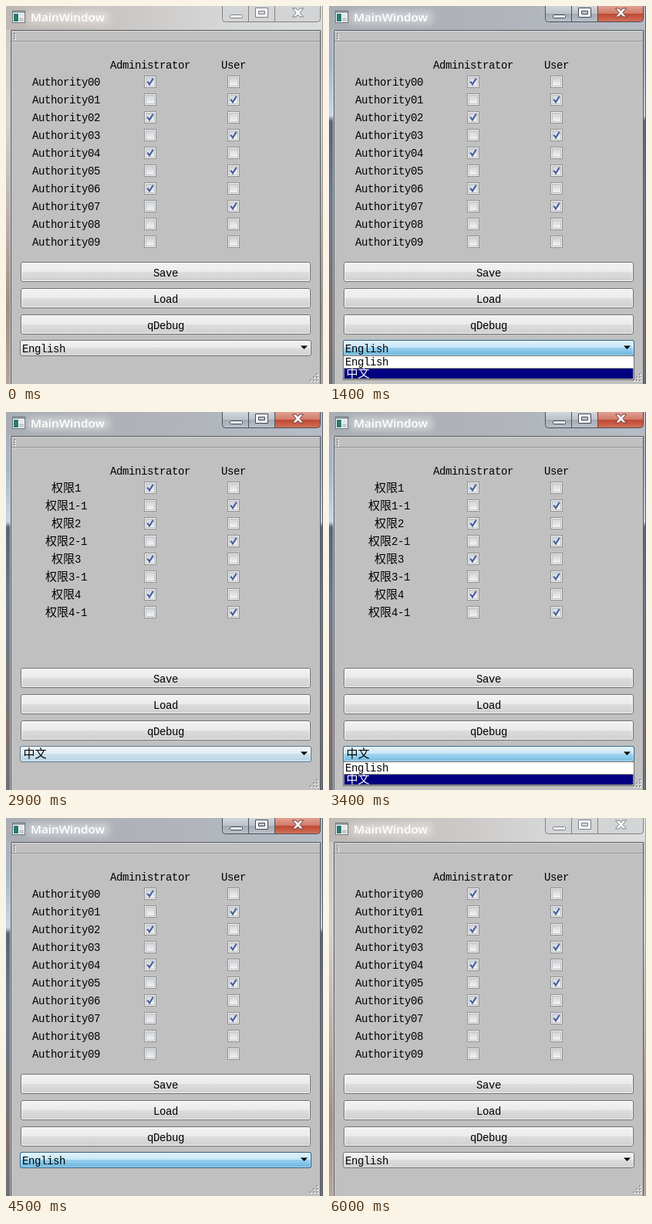
An HTML page for the animation above (6.1 s loop, 411x489 px).

```html
<!DOCTYPE html>
<html lang="en">
<head>
<meta charset="utf-8">
<title>MainWindow</title>
<style>
html, body { margin: 0; width: 100%; height: 100%; overflow: hidden; background: #c0c0c0; }
svg { display: block; }
text { font: 14px "Liberation Mono", monospace; letter-spacing: -0.4px; fill: #000; white-space: pre; }
.cjk { font: 300 15px "Noto Sans CJK SC", "Noto Sans CJK", sans-serif; letter-spacing: 0; }
.title { font: 600 15.2px "Open Sans", "Noto Sans", sans-serif; letter-spacing: 0; fill: #fff; }
.mid { text-anchor: middle; }
</style>
</head>
<body>
<svg id="stage" width="411" height="489" viewBox="0 0 411 489"></svg>
<script>
const LOOP = 6100;
const stage = document.getElementById('stage');

const rect = (x, y, w, h, fill, extra = '') =>
  `<rect x="${x}" y="${y}" width="${w}" height="${h}" fill="${fill}" ${extra}/>`;
const path = (d, extra) => `<path d="${d}" ${extra}/>`;
const text = (x, y, s, cls = '', extra = '') =>
  `<text x="${x}" y="${y}" class="${cls}" ${extra}>${s}</text>`;
const grad = (id, stops, across = false) =>
  `<linearGradient id="${id}" x2="${across ? 1 : 0}" y2="${across ? 0 : 1}">` +
  stops.map(([o, c]) => `<stop offset="${o}" stop-color="${c}"/>`).join('') + '</linearGradient>';
const split = (id, a, b, c, d) => grad(id, [[0, a], [.5, b], [.5, c], [1, d]]);

// CJK runs get their own face, the rest stays half width
const mixed = s => s.replace(/[\u4e00-\u9fff]+/g, m => `<tspan class="cjk">${m}</tspan>`);

const defs = '<defs>' +
  split('normal', '#f2f2f2', '#ebebeb', '#dddddd', '#cfcfcf') +
  split('hot', '#eaf6fd', '#d9f0fc', '#bee6fd', '#a7d9f5') +
  split('pressed', '#e5f4fc', '#c4e5f6', '#98d1ef', '#68b3db') +
  split('red', '#e2a598', '#d07a69', '#bd4630', '#d4715a') +
  split('glass', '#d3d7dd', '#bec3ca', '#a3a9b2', '#bbc1c9') +
  grad('box', [[0, '#cfd2d6'], [1, '#f5f5f5']]) +
  grad('idleTop', [[0, '#bdb8b3'], [.35, '#c9c6c3'], [.7, '#d6d7d8'], [1, '#dcdddd']], true) +
  grad('idleSide', [[0, '#c9c6c3'], [.3, '#d4d1ce'], [.6, '#b9aca2'], [.8, '#a08f84'], [1, '#b5a59a']]) +
  grad('liveTop', [[0, '#a9adb4'], [.5, '#b0b3b9'], [1, '#b6bcc5']], true) +
  grad('liveSide', [[0, '#abb0b8'], [.15, '#a6b6ca'], [.29, '#c8d8e8'], [.305, '#56657a'], [.5, '#6b7a8c'], [.72, '#77747d'], [.85, '#80706f'], [1, '#6d7078']]) +
  '<clipPath id="popClip"><rect id="popWin" x="18" y="452" width="378" height="32"/></clipPath>' +
  '<filter id="glow" x="-20%" y="-90%" width="140%" height="280%"><feGaussianBlur stdDeviation="5"/></filter>' +
  '</defs>';

function frame(kind) {
  const live = kind === 'live';
  const edge = live ? '#4d5259' : '#85817e';
  const lobe = (x, w, fill, r1, r2) => path(
    `M${x} -1V${20.5 - r1}Q${x} 20.5 ${x + r1} 20.5H${x + w - r2}Q${x + w} 20.5 ${x + w} ${20.5 - r2}V-1Z`,
    `fill="${fill}" stroke="${edge}"`);
  const glass = live ? 'url(#glass)' : '#d3d4d5';
  const ink = live ? '#3f4650' : '#777b84';
  return `<g id="${kind}">` +
    rect(0, 0, 411, 489, `url(#${kind}Side)`) +
    rect(0, 0, 411, 31, `url(#${kind}Top)`) +
    rect(28, 7, 106, 16, '#fff', 'opacity=".4" filter="url(#glow)"') +
    lobe(280.5, 34, glass, 4, 0) + lobe(314.5, 34, glass, 0, 0) +
    lobe(348.5, 59, live ? 'url(#red)' : glass, 0, 4) +
    rect(290.5, 11.5, 16, 4, '#fff', `stroke="${ink}" rx="1"`) +
    path('M323.5 2.5H339.5V14.5H323.5ZM327.5 6.5V10.5H335.5V6.5Z',
      `fill="#fff" fill-rule="evenodd" stroke="${ink}"`) +
    path('M371.5 3h4.5l2.5 3 2.5-3h4.5l-4.6 5.5 4.6 5.5h-4.5l-2.5-3-2.5 3h-4.5l4.6-5.5z',
      `fill="#fff" stroke="${live ? '#6b3a3a' : ink}"`) +
    rect(410, 0, 1, 489, live ? '#59616b' : '#a9a39f') +
    rect(5, 30, 1, 459, '#e2e4e6', 'opacity=".7"') +
    '</g>';
}

const icon =
  rect(8.5, 6.5, 16, 15, '#fbfbfb', 'stroke="#6a7278"') +
  rect(9, 7, 15, 2, '#98a4aa') +
  rect(10, 10, 6, 10, '#267a72') + rect(17, 10, 6, 4, '#e2e6e8') + rect(17, 15, 6, 5, '#c6cccf');

function checkbox(x, y, on) {
  return rect(x + .5, y + .5, 15, 15, '#f4f4f4', 'stroke="#8e8f8f"') +
    rect(x + 2.5, y + 2.5, 11, 11, 'url(#box)', 'stroke="#bcc0c5"') +
    (on ? path(`M${x + 4.2} ${y + 7.6}L${x + 7} ${y + 11.3}L${x + 11.8} ${y + 3.8}`,
      'fill="none" stroke="#435c9e" stroke-width="2.1"') : '');
}

function bevel(x, y, w, h, layers, shine = .8) {
  return rect(x + .5, y + .5, w - 1, h - 1, 'url(#normal)', 'rx="2.5" stroke="#707070"') +
    layers + rect(x + 1.5, y + 1.5, w - 3, h - 3, 'none', `rx="1.5" stroke="#fff" stroke-opacity="${shine}"`);
}
const layer = (id, x, y, w, h, fill, line) =>
  rect(x + .5, y + .5, w - 1, h - 1, `url(#${fill})`, `id="${id}" rx="2.5" stroke="${line}" opacity="0"`);

function button(i, label) {
  const y = 331 + 34 * i;
  return bevel(19, y, 376, 26, layer('btn' + i, 19, y, 376, 26, 'hot', '#3c7fb1')) +
    text(207, y + 18.5, label, 'mid');
}

function grip() {
  let s = '';
  for (let r = 0; r < 3; r++)
    for (let c = 2 - r; c < 3; c++) {
      const x = 394 + c * 4, y = 475 + r * 4;
      s += rect(x + 1, y + 1, 2, 2, '#fff') + rect(x, y, 2, 2, '#969696');
    }
  return s;
}

function rows() {
  let boxes = '', en = '', zh = '';
  for (let i = 0; i < 10; i++) {
    const y = 90 + 23 * i, used = i < 8;
    const pair = checkbox(179, y, used && i % 2 === 0) + checkbox(287, y, used && i % 2 === 1);
    if (used) boxes += pair; else en += pair;
    en += text(34, y + 13, 'Authority0' + i);
    if (used) zh += text(78, y + 13, mixed('权限' + ((i >> 1) + 1) + (i % 2 ? '-1' : '')), 'mid');
  }
  return boxes + `<g id="en">${en}</g><g id="zh">${zh}</g>`;
}

const option = (id, y, s, x) =>
  rect(19.5, y + .5, 375, 14, '#000080',
    `id="${id}Bar" stroke="#d8d860" stroke-dasharray="1 1" stroke-dashoffset=".5"`) +
  text(x, y + 12, mixed(s), '', `id="${id}Txt"`);

stage.innerHTML = defs + frame('idle') + frame('live') + icon +
  text(32, 20, 'MainWindow', 'title') +
  rect(6, 31, 402, 458, '#c0c0c0') +
  path('M6.5 489V31.5H407.5V489', 'fill="none" stroke="#55595e"') +
  rect(7, 32, 400, 1, '#d8d8d8') + rect(7, 45, 400, 1, '#939393') + rect(7, 46, 400, 1, '#cdcdcd') +
  [35, 38, 41].map(y => rect(11, y + 1, 2, 2, '#f4f4f4') + rect(10, y, 2, 2, '#949494')).join('') +
  text(135, 81, 'Administrator') + text(279, 81, 'User') + rows() +
  ['Save', 'Load', 'qDebug'].map((s, i) => button(i, s)).join('') +
  bevel(18, 432, 378, 21,
    layer('comboHot', 18, 432, 378, 21, 'hot', '#3c7fb1') +
    layer('comboDown', 18, 432, 378, 21, 'pressed', '#2c628b'), .4) +
  path('M382 440H391L386.5 444.5Z', 'fill="#000" transform="translate(0 -.5)"') +
  text(21, 447.5, 'English', '', 'id="pickEn"') + text(22.5, 447, mixed('中文'), '', 'id="pickZh"') +
  grip() +
  '<g id="popup" clip-path="url(#popClip)"><g id="list">' +
  rect(18.5, 452.5, 377, 31, '#fff', 'stroke="#6f6f6f"') +
  option('optEn', 453, 'English', 21) + option('optZh', 468, '中文', 22.5) +
  '</g><path id="popEdge" d="M18 0H396" stroke="#6f6f6f"/></g>';

const el = {};
stage.querySelectorAll('[id]').forEach(n => el[n.id] = n);
const show = (n, on) => n.setAttribute('display', on ? 'inline' : 'none');
const fade = (n, v) => n.setAttribute('opacity', v);

// value of the last [time, value] pair already reached
const at = (t, keys) => keys.reduce((v, k) => t >= k[0] ? k[1] : v, 0);

const hover = [
  [[400, .8], [500, .4], [600, 0]],
  [[500, .7], [600, .3], [700, 0]],
  [[600, .6], [700, .12], [1100, 0]]
];
const hotKeys = [[600, .4], [700, 1], [2300, .5], [2400, 0], [2900, .5], [3000, 1], [4600, .5], [4700, 0]];
const downKeys = [[1100, .7], [1400, 1], [2300, .2], [2400, 0], [3300, .3], [3400, .8], [3500, .9], [3600, 1], [4600, .2], [4700, 0]];
const openKeys = [[1000, 11], [1100, 32], [2200, 0], [3300, 11], [3400, 32], [4500, 0]];

function setOption(id, on) {
  show(el[id + 'Bar'], on);
  el[id + 'Txt'].style.fill = on ? '#fff' : '#000';
}

function draw(t) {
  const live = t >= 1000 && t < 6000;
  show(el.live, live);
  show(el.idle, !live);

  const zh = t >= 2200 && t < 4500;
  show(el.en, !zh); show(el.pickEn, !zh);
  show(el.zh, zh); show(el.pickZh, zh);

  hover.forEach((keys, i) => fade(el['btn' + i], at(t, keys)));
  fade(el.comboHot, at(t, hotKeys));
  fade(el.comboDown, at(t, downKeys));

  const h = at(t, openKeys);
  show(el.popup, h > 0);
  el.popWin.setAttribute('height', h);
  el.list.setAttribute('transform', `translate(0 ${h - 32})`);
  el.popEdge.setAttribute('transform', `translate(0 ${451.5 + h})`);

  const second = t >= 1400 && t < 3900;
  setOption('optEn', !second);
  setOption('optZh', second);
}

const start = performance.now();
function tick() {
  draw((performance.now() - start) % LOOP);
  requestAnimationFrame(tick);
}
draw(0);
requestAnimationFrame(tick);
</script>
</body>
</html>
```
